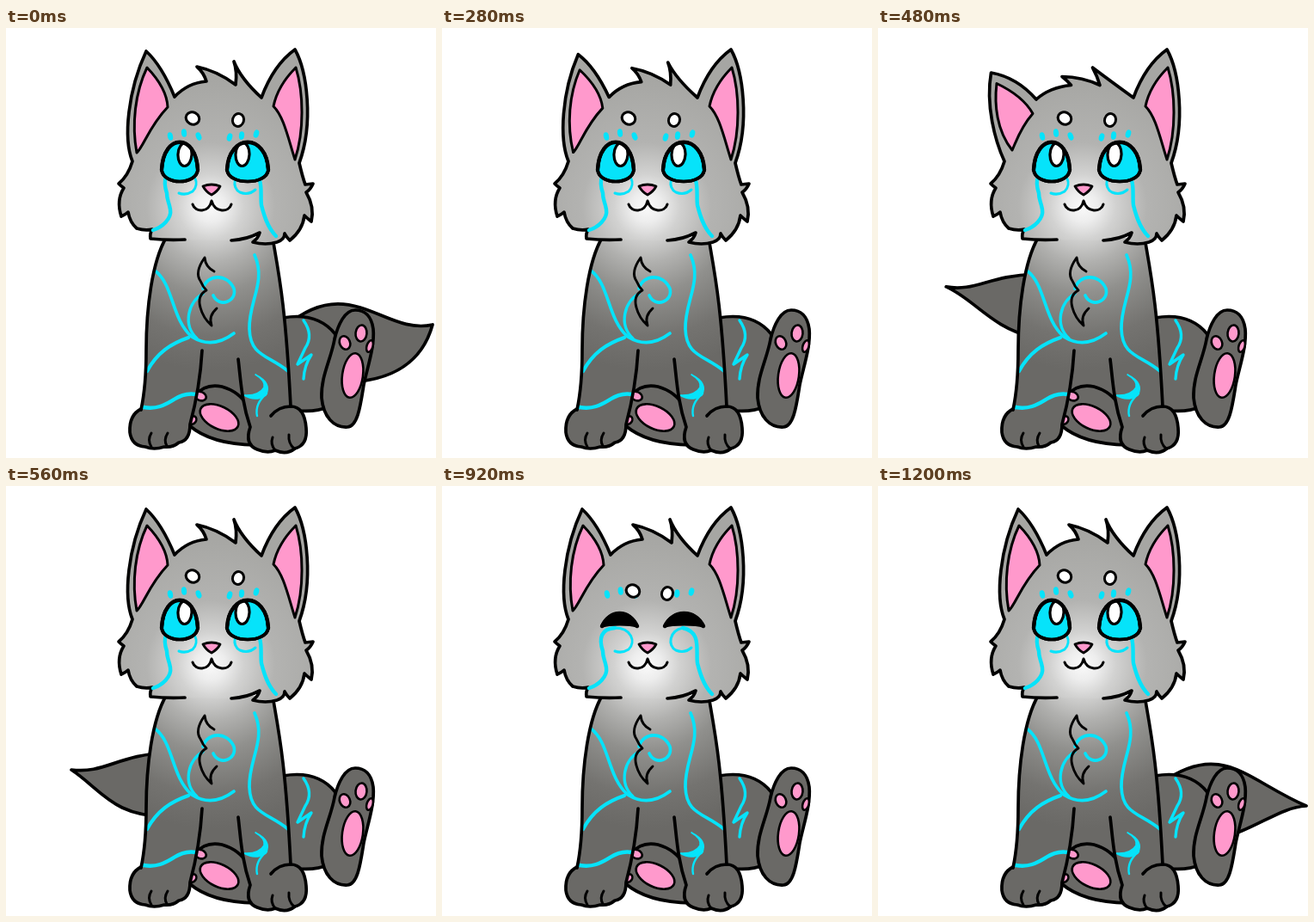
An HTML page with a canvas that plays this animation: 500 px wide and 500 px high, repeating every 1240 ms.

```html
<!DOCTYPE html>
<html lang="en">
<head>
<meta charset="utf-8">
<title>Sitting cat</title>
<style>
  html, body { margin: 0; width: 100%; height: 100%; overflow: hidden; background: #fff; }
  canvas { display: block; width: 100vw; height: 100vh; }
</style>
</head>
<body>
<canvas id="stage" width="500" height="500"></canvas>
<script>
const ctx = document.getElementById('stage').getContext('2d');
const LOOP = 1240, STEP = 40;
const DARK = '#6a6966', CYAN = '#06e3fa', PINK = '#ff99cc', BLACK = '#000';
ctx.lineCap = ctx.lineJoin = 'round';

const mix = (a, b, k) => a + (b - a) * k;
const ease = k => k * k * (3 - 2 * k);

function draw(path, fill, stroke = BLACK, width = 3.7) {
  const p = new Path2D(path);
  if (fill) { ctx.fillStyle = fill; ctx.fill(p); }
  if (stroke) { ctx.strokeStyle = stroke; ctx.lineWidth = width; ctx.stroke(p); }
}
const line = (path, color = BLACK, width = 3.7) => draw(path, null, color, width);

function oval(x, y, rx, ry, turn, fill, width = 0) {
  ctx.beginPath();
  ctx.ellipse(x, y, rx, ry, turn, 0, Math.PI * 2);
  ctx.fillStyle = fill;
  ctx.fill();
  if (width) { ctx.strokeStyle = BLACK; ctx.lineWidth = width; ctx.stroke(); }
}

function glow(radius, stops) {
  const g = ctx.createRadialGradient(238, 208, 0, 238, 208, radius);
  stops.forEach(([at, color]) => g.addColorStop(at / radius, color));
  return g;
}
const headFill = glow(150, [[0, '#fafafa'], [18, '#ededed'], [38, '#d2d2d1'], [75, '#b3b3b1'], [150, '#a6a6a3']]);
const bodyFill = glow(190, [[0, '#f0f0f0'], [38, '#d0d0cf'], [65, '#b0b0ae'], [100, '#90908d'], [150, '#747370'], [190, DARK]]);

// Piecewise eased value from [time, value] pairs.
function track(keys, t) {
  if (t <= keys[0][0]) return keys[0][1];
  for (let i = 1; i < keys.length; i++) {
    const [t0, a] = keys[i - 1], [t1, b] = keys[i];
    if (t <= t1) return mix(a, b, ease((t - t0) / (t1 - t0)));
  }
  return keys[keys.length - 1][1];
}

// Tail poses: root, two controls, tip, two controls, root.
const PIVOT = [260, 390];
const tailPoses = [
  [0,    '325,347 400,283 440,358 496,345 485,385 453,412 390,412'],
  [160,  '300,308 355,285 380,245 387,207 425,255 415,305 395,335'],
  [280,  '215,330 215,290 235,260 250,235 270,260 285,290 290,330'],
  [400,  '185,325 160,305 140,262 114,248 140,258 160,252 200,258'],
  [560,  '190,384 125,386 110,352 76,330 115,335 130,312 190,310'],
  [720,  '185,368 125,345 105,295 118,250 132,280 150,290 190,290'],
  [920,  '215,330 215,290 235,260 250,235 270,260 285,290 290,330'],
  [1040, '310,265 350,252 385,258 425,245 385,270 365,310 345,345'],
  [1200, '330,345 400,295 430,343 498,372 465,374 440,400 390,412']
].map(([time, text]) => ({
  time,
  polar: text.split(' ').flatMap(pair => {
    const [x, y] = pair.split(',').map(Number);
    const dx = x - PIVOT[0], dy = PIVOT[1] - y;
    return [Math.atan2(dx, dy), Math.hypot(dx, dy)];
  })
}));

function tailAt(t) {
  const n = tailPoses.length;
  const key = i => ({
    time: tailPoses[(i + n) % n].time + Math.floor(i / n) * LOOP,
    polar: tailPoses[(i + n) % n].polar
  });
  let i = n - 1;
  while (tailPoses[i].time > t) i--;
  const [a, b, c, d] = [key(i - 1), key(i), key(i + 1), key(i + 2)];
  const span = c.time - b.time, k = (t - b.time) / span;
  const values = b.polar.map((p, j) => {
    const q = c.polar[j];
    const m0 = (q - a.polar[j]) / (c.time - a.time) * span;
    const m1 = (d.polar[j] - p) / (d.time - b.time) * span;
    return mix(p, q, ease(k)) + k * (1 - k) * ((1 - k) * m0 - k * m1);
  });
  const pts = [];
  for (let j = 0; j < values.length; j += 2) {
    const [angle, r] = [values[j], values[j + 1]];
    pts.push(`${PIVOT[0] + Math.sin(angle) * r},${PIVOT[1] - Math.cos(angle) * r}`);
  }
  return `M${PIVOT}L${pts[0]}C${pts.slice(1, 4).join(' ')}C${pts.slice(4).join(' ')}Z`;
}

function drawHindLeg() {
  draw('M322,337Q362,330 383,356L376,440Q360,447 340,445L318,440Z', DARK);
  line('M346,340Q358,357 348,372L339,391L355,380Q347,392 346,408', CYAN, 3.4);
  draw('M406,328C394,328 386,345 382,362C378,385 366,405 367,430C369,452 381,465 397,464' +
       'C409,463 412,440 416,415C420,395 429,370 427,350C425,335 417,328 406,328Z', DARK);
  oval(413, 355, 6.5, 9.5, 0.1, PINK, 2.6);
  oval(394, 366, 6, 8, -0.4, PINK, 2.6);
  oval(423, 370, 3.5, 7, 0.3, PINK, 2.6);
  oval(403, 404, 12, 26, 0.14, PINK, 2.6);
}

function drawBody() {
  const leftSide = 'M186,244C170,272 163,325 163,375C163,410 160,430 157,444';
  const rightSide = 'M310,244C317,285 325,320 331,440';
  draw(leftSide + 'L331,440C325,320 317,285 310,244Z', bodyFill, null);
  draw('M220,427Q232,413 251,417Q272,423 282,441L290,485Q238,484 213,462Z', DARK);
  oval(248, 453, 24, 13, 0.45, PINK, 2.6);
  oval(226, 428, 7, 5, 0.4, PINK, 2.6);
  oval(217, 456, 4, 5, 0.6, PINK, 2.6);

  const leftPaw = 'M228,375C226,410 221,435 214,461Q214,480 201,482Q194,488 184,487' +
    'Q172,491 162,487Q146,486 144,470Q143,450 157,443';
  const rightPaw = 'M270,385C273,410 274,435 284,464Q277,484 292,490Q304,495 313,491' +
    'Q326,497 336,489Q351,485 349,465Q347,440 331,440';
  draw(leftPaw + 'C162,420 163,395 163,375Z', bodyFill, null);
  draw(rightPaw + 'L326,370Z', bodyFill, null);

  line('M173,282C195,298 192,338 216,359Q240,374 265,355', CYAN);
  line('M164,399C176,377 192,367 212,360', CYAN, 4.2);
  line('M229,309C212,318 205,345 222,361', CYAN, 3.4);
  line('M229,303C234,286 257,285 265,303C269,318 248,326 241,311', CYAN);
  line('M289,264C303,295 282,318 283,350C284,382 305,380 328,399', CYAN);
  line('M160,441C190,446 195,422 221,426', CYAN, 4.4);
  draw('M290,403Q302,410 300,418Q294,428 277,427Q290,435 302,427Q310,413 290,403Z', CYAN, CYAN, 1.6);
  line('M303,425Q289,437 292,451', CYAN, 2.4);
  line('M242,283Q232,278 231,267Q219,284 226,294Q229,301 233,305Q222,311 226,325Q229,337 239,346Q235,335 245,326', BLACK, 2.9);

  line(leftSide);
  line(rightSide);
  line(leftPaw);
  line(rightPaw + 'Q317,440 308,451');
  line('M169,471Q164,479 169,487M188,471Q183,479 187,486M310,476Q307,484 313,491M329,473Q328,483 335,489', BLACK, 3);
}

function drawHead(twitch) {
  const pt = (x, y, x2, y2) => `${mix(x, x2, twitch)},${mix(y, y2, twitch)} `;
  const outline =
    'M208,246Q188,247 168,245Q167,239 170,234Q162,236 152,233Q144,226 142,214Q139,217 134,219' +
    'Q128,200 137,186Q134,184 131,181Q142,172 147,155' +
    'C' + pt(136, 128, 136, 134) + pt(142, 72, 108, 108) + pt(163, 27, 100, 77) +
    'C' + pt(175, 38, 128, 73) + pt(187, 58, 153, 76) + pt(196, 80, 172, 86) +
    'Q' + pt(211, 64, 188, 74) + pt(233, 62, 216, 71) +
    'Q' + pt(230, 52, 211, 71) + pt(222, 45, 206, 68) +
    'Q' + pt(246, 50, 230, 64) + pt(267, 66, 249, 67) +
    'Q' + pt(269, 50, 241, 62) + pt(265, 39, 234, 53) +
    'Q' + pt(273, 59, 263, 61) + '297,81' +
    'Q311,43 336,25C350,50 358,110 341,157Q345,174 348,182L357,181Q354,188 349,191' +
    'Q359,208 355,225Q351,222 347,218Q345,235 330,247Q326,243 324,239Q324,246 315,249' +
    'Q302,253 287,249Q293,245 295,238Q280,246 262,247';
  draw(outline, headFill);

  draw('M' + pt(164, 46, 112, 83) +
       'C' + pt(150, 75, 120, 103) + pt(146, 112, 130, 127) + pt(152, 145, 160, 139) +
       'C' + pt(160, 138, 160, 130) + pt(166, 115, 164, 118) + pt(188, 92, 172, 107) +
       'Q' + pt(187, 70, 150, 88) + pt(164, 46, 112, 83) + 'Z', PINK, BLACK, 3);
  draw('M337,46Q316,67 311,91C323,103 328,128 336,153C347,120 346,75 337,46Z', PINK, BLACK, 3);
}

function drawEye(left, right, shine, shut) {
  const level = (open, half, closed) => shut < 0.5 ? mix(open, half, shut * 2) : mix(half, closed, shut * 2 - 1);
  const cy = level(165, 164, 163);
  const top = level(122, 141, 143), bottom = level(183, 173, 160);
  const pinch = level(2, 5, 9);
  const lid = `M${left},${cy}C${left + pinch},${top} ${right - pinch},${top} ${right},${cy}`;
  const path = `${lid}C${right - pinch},${bottom} ${left + pinch},${bottom} ${left},${cy}Z`;
  const closed = shut > 0.85;
  draw(path, closed ? BLACK : CYAN);
  if (!closed) {
    ctx.save();
    ctx.clip(new Path2D(path));
    oval(shine, level(147, 152, 155), level(8, 9, 9), level(13.5, 5.5, 1), 0.05, '#fff', 3.2);
    ctx.restore();
    line(path);
  }
  line(lid, BLACK, 4.4);
}

function drawFace(shut) {
  line('M171,235C181,232 193,222 191,211C189,200 187,200 187,192C182,177 185,166 201,165', CYAN, 4.4);
  line('M201,165C220,165 226,181 217,190Q209,195 201,192', CYAN, 3);
  line('M314,242C304,232 300,218 297,206C295,190 302,170 280,165', CYAN, 4.4);
  line('M280,165C264,168 262,186 272,191Q282,195 290,188', CYAN, 3);

  const drop = shut * shut;
  [[191, 126, -0.2], [207, 122, -0.1], [224, 126, -0.4], [260, 127, 0.3], [274, 125, 0.1], [291, 123, 0.3]]
    .forEach(([x, y, turn]) => oval(mix(x, 240 + (x - 240) * 0.98, shut), y, 3.1, 4.8, turn, CYAN));
  oval(mix(217, 222, drop), mix(105, 122, drop), 8, 7, 0.5, '#fff', 3);
  oval(mix(270, 262, drop), mix(107, 125, drop), 6.5, 7.5, 0.3, '#fff', 3);

  drawEye(mix(181, 186, shut), mix(223, 227, shut), 208, shut);
  drawEye(mix(257, 259, shut), mix(305, 304, shut), mix(275, 281, shut), shut);

  draw('M229,184Q239,180 249,184Q246,190 239,194Q233,191 229,184Z', PINK, BLACK, 2.8);
  line('M217,205C220,215 236,215 239,201C243,215 259,215 262,205', BLACK, 3);
}

function render(t) {
  ctx.fillStyle = '#fff';
  ctx.fillRect(0, 0, 500, 500);
  draw(tailAt(t), DARK);
  drawHindLeg();
  drawBody();
  drawHead(track([[260, 0], [380, 1], [420, 1], [540, 0]], t));
  drawFace(track([[600, 0], [720, 0.5], [840, 1], [1000, 1], [1080, 0.5], [1160, 0]], t));
}

function tick() {
  const t = performance.now() % LOOP;
  render(Math.floor(t / STEP) * STEP);
  requestAnimationFrame(tick);
}
tick();
</script>
</body>
</html>
```
